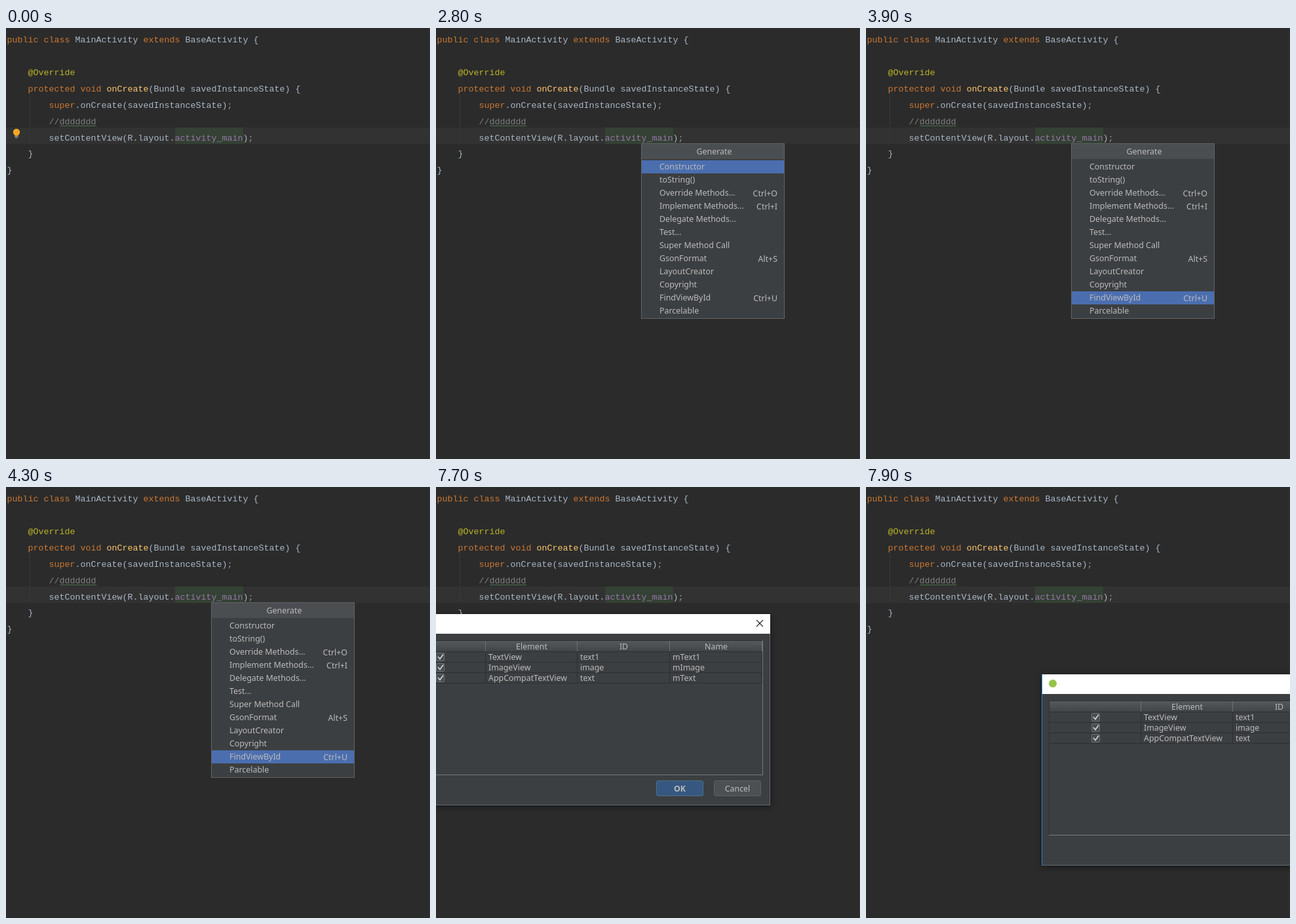
An HTML page that plays this animation: 647 px wide and 658 px high, repeating every 8000 ms.

```html
<!DOCTYPE html>
<html lang="en">
<head>
<meta charset="utf-8">
<title>Generate menu</title>
<style>
html, body { margin: 0; width: 100%; height: 100%; overflow: hidden; background: #2b2b2b; }
svg { display: block; }
text { white-space: pre; }
.code { font: 13.333px "Liberation Mono", monospace; }
.ui { font: 12.4px "Noto Sans", sans-serif; fill: #bbb; }
.mid { text-anchor: middle; }
.end { text-anchor: end; }
.shadow { filter: drop-shadow(0 2px 5px rgba(0, 0, 0, .45)); }
</style>
</head>
<body>
<svg id="stage" width="647" height="658" viewBox="0 0 647 658"></svg>
<script>
const LOOP = 8000;
const PLAIN = '#a9b7c6', KEY = '#cc7832', NOTE = '#bbb529', METHOD = '#ffc66d',
      GREY = '#808080', FIELD = '#9876aa', END = '#96938f';

const rect = (x, y, w, h, fill, more = '') =>
  `<rect x="${x}" y="${y}" width="${w}" height="${h}" fill="${fill}" ${more}/>`;
const path = (d, stroke, width = 1) =>
  `<path d="${d}" fill="none" stroke="${stroke}" stroke-width="${width}"/>`;
const label = (x, y, text, cls = '', more = '') =>
  `<text class="ui ${cls}" x="${x}" y="${y}" ${more}>${text}</text>`;

// Each line: baseline, first column, then text and colour in turn
const lines = [
  [22, 0, 'public class ', KEY, 'MainActivity ', PLAIN, 'extends ', KEY, 'BaseActivity {', PLAIN],
  [72, 4, '@Override', NOTE],
  [97, 4, 'protected void ', KEY, 'onCreate', METHOD, '(Bundle savedInstanceState) {', PLAIN],
  [122, 8, 'super', KEY, '.onCreate(savedInstanceState)', PLAIN, ';', END],
  [147, 8, '//ddddddd', GREY],
  [172, 8, 'setContentView(R.layout.', PLAIN, 'activity_main', FIELD, ')', PLAIN, ';', END],
  [196, 4, '}', PLAIN],
  [221, 0, '}', PLAIN]
];

function codeLine([y, col, ...runs]) {
  let out = '';
  for (let i = 0; i < runs.length; i += 2) {
    const style = runs[i + 1] === FIELD ? 'font-style="italic"' : '';
    out += `<text class="code" x="${1.5 + col * 8}" y="${y}" fill="${runs[i + 1]}" ${style}>${runs[i]}</text>`;
    col += runs[i].length;
  }
  return out;
}

const editor = () =>
  rect(0, 0, 647, 658, '#2b2b2b') +
  rect(0, 152, 647, 25, '#323232') +
  rect(258, 152, 104, 25, '#344134') +
  rect(36, 102, 1, 75, '#393939') +
  rect(646, 0, 1, 658, '#353535') +
  lines.map(codeLine).join('') +
  path('M82 150.5' + 'l2 -2l2 2'.repeat(14), '#5b8a60') +
  `<g id="bulb"><circle cx="16" cy="159" r="5.2" fill="#f4a723"/>
   ${rect(13.5, 162, 5, 2.5, '#f4a723')}${rect(13, 165, 6, 1, '#a8a8a8')}${rect(14, 167, 4, 1, '#a8a8a8')}</g>` +
  rect(313, 152, 2, 25, '#bbb', 'id="caret"');

const items = ['Constructor', 'toString()', 'Override Methods...', 'Implement Methods...',
  'Delegate Methods...', 'Test...', 'Super Method Call', 'GsonFormat', 'LayoutCreator',
  'Copyright', 'FindViewById', 'Parcelable'];
const shortcuts = { 2: 'Ctrl+O', 3: 'Ctrl+I', 7: 'Alt+S', 10: 'Ctrl+U' };

const menu = () => `<g id="menu">` +
  rect(313.5, 176.5, 218, 267, '#3c3f41', 'stroke="#616466"') +
  rect(314, 177, 217, 23, '#4b4e51') +
  label(424.5, 193, 'Generate', 'mid') +
  rect(314, 202, 217, 20, '#4b6eaf', 'id="pick"') +
  items.map((name, i) => label(341, 216 + 20 * i, name) +
    (shortcuts[i] ? label(521, 217 + 20 * i, shortcuts[i], 'end') : '')).join('') +
  '</g>';

const table = [
  ['TextView', 'text1', 'mText1'],
  ['ImageView', 'image', 'mImage'],
  ['AppCompatTextView', 'text', 'mText']
];

function tableRow(cells, i) {
  const y = 57 + 16 * i;
  return rect(11, y + 16, 562, 1, '#2d2f31') +
    rect(76.5, y + 2.5, 12, 12, '#484c4f', 'rx="1.5" stroke="#707375"') +
    path(`M79 ${y + 8}l3 3.5l5 -7`, '#d0d0d0', 1.7) +
    cells.map((text, c) => label([156, 296, 437][c], y + 13, text)).join('');
}

const button = (x, text, fill, edge, weight) =>
  rect(x + .5, 254.5, 71, 23, fill, `rx="2.5" stroke="${edge}"`) +
  label(x + 36, 271, text, 'mid', `font-weight="${weight}" style="font-weight:${weight}"`);

const dialog = () => `<g id="dialog">
  <linearGradient id="head" x2="0" y2="1"><stop stop-color="#55595b"/><stop offset="1" stop-color="#414547"/></linearGradient>` +
  rect(0, 0, 586, 292, '#3c3f41', 'class="shadow"') +
  rect(0, 0, 586, 30, '#fff') +
  path('M585.5 30V291.5H0', '#5c6b76') +
  rect(0, 0, 1, 292, '#1883d7') +
  '<circle cx="17" cy="14" r="6" fill="#97c24a"/>' +
  path('M565 9.2l10 10m0 -10l-10 10', '#111', 1.2) +
  rect(11, 41, 563, 16, 'url(#head)') +
  rect(11, 57, 563, 1, '#2d2f31') +
  table.map(tableRow).join('') +
  [151, 291, 432, 573].map(x => rect(x, 41, 1, 16, '#6d7072') + rect(x, 57, 1, 49, '#2d2f31')).join('') +
  path('M11.5 245V40.5H574', '#2d2f31') +
  path('M574.5 40V245.5H11', '#76797b') +
  label(222, 54, 'Element', 'mid') + label(362.5, 54, 'ID', 'mid') + label(503.5, 54, 'Name', 'mid') +
  button(412, 'OK', '#365880', '#4c708c', 700) +
  button(500, 'Cancel', '#4c5052', '#5e6163', 400) +
  '</g>';

const stage = document.getElementById('stage');
stage.innerHTML = editor() + menu() + dialog();
const [bulb, caret, menuBox, pick, box] =
  ['bulb', 'caret', 'menu', 'pick', 'dialog'].map(id => document.getElementById(id));

const picks = [[2800, 0], [3600, 5], [3700, 9], [3900, 10], [4000, 11], [4300, 10]];
const show = (el, on) => el.setAttribute('visibility', on ? 'visible' : 'hidden');
const within = (t, from, to) => t >= from && t < to;

function draw(t) {
  show(bulb, t < 800);
  show(caret, within(t, 800, 1700) || within(t, 2200, 2700));

  const open = within(t, 2800, 5200);
  show(menuBox, open);
  if (open) pick.setAttribute('y', 202 + 20 * picks.filter(p => p[0] <= t).pop()[1]);

  // The dialog is dragged in 100 ms steps
  show(box, t >= 7700);
  const step = Math.max(0, Math.floor((t - 7700) / 100));
  box.setAttribute('transform', `translate(${-76 + 172 * step} ${194 + 46 * step})`);
}

function tick() {
  draw(performance.now() % LOOP);
  requestAnimationFrame(tick);
}
tick();
</script>
</body>
</html>
```
